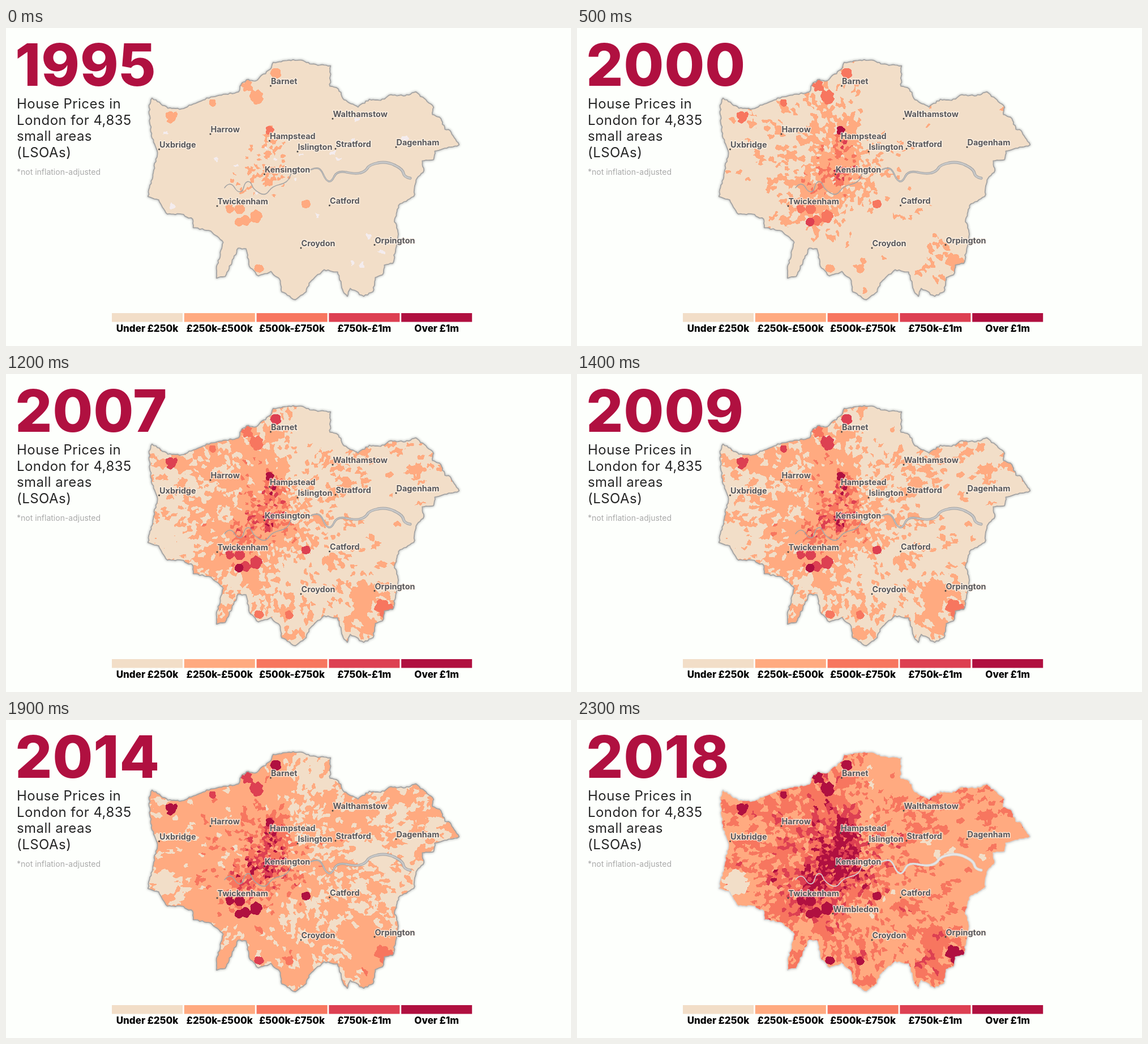
Recreate the animation shown at these times as an HTML page with a canvas. Size 998 by 561 pixels, loop 5.3 s.

```html
<!DOCTYPE html>
<html lang="en">
<head>
<meta charset="utf-8">
<title>House prices in London</title>
<style>
html, body { margin: 0; width: 100%; height: 100%; overflow: hidden; background: #fdfffc; }
canvas, svg { position: absolute; left: 0; top: 0; }
text { font-family: Inter, "Open Sans", sans-serif; }
.year { font-size: 103px; font-weight: 800; letter-spacing: .6px; fill: #b01040; }
.title { font-size: 24px; letter-spacing: .45px; fill: #262626; }
.note { font-size: 14px; fill: #aaa; }
.key { font-size: 17px; font-weight: 800; text-anchor: middle; }
.place { font-size: 14.4px; font-weight: 700; fill: #58585c; stroke: #fff4ea; stroke-opacity: .75;
  stroke-width: 3px; stroke-linejoin: round; paint-order: stroke; }
</style>
</head>
<body>
<canvas width="998" height="561"></canvas>
<svg width="998" height="561"></svg>
<script>
const ctx = document.querySelector('canvas').getContext('2d');
const svg = document.querySelector('svg');
const COLORS = ['#f2dec8', '#ffaa80', '#f7765f', '#dd4052', '#b01040'];
const NO_DATA = '#f4ecee';
const LEGEND = ['Under £250k', '£250k-£500k', '£500k-£750k', '£750k-£1m', 'Over £1m'];
const PLACES = {
  Barnet: [467.5, 102], Walthamstow: [577, 160], Harrow: [361, 187], Hampstead: [465.5, 199],
  Islington: [515, 218], Stratford: [582, 213], Dagenham: [689, 210], Uxbridge: [270.5, 214],
  Kensington: [456.5, 258], Twickenham: [373, 314], Catford: [571.5, 313], Croydon: [521, 388],
  Orpington: [651, 382.5], Wimbledon: [452, 341.5]
};

const OUTLINE = `258,124 286,142 310,143 362,122 411,113 417,97 428,91 440,94 467,73 472,61 500,57 525,58
  540,64 573,67 572,103 587,108 597,127 622,140 642,126 662,128 680,118 705,120 724,113 755,140 753,153
  768,160 775,179 784,181 800,206 757,217 755,232 735,234 738,251 724,268 720,297 693,313 686,338 692,360
  688,390 683,415 668,418 665,435 652,440 648,465 632,473 608,459 603,473 596,465 586,430 562,426 535,450
  530,465 511,479 487,465 485,446 468,429 446,437 430,420 424,389 410,388 387,438 372,441 372,425 384,378
  362,358 331,352 330,337 310,328 285,328 270,303 251,297 268,220 257,190 253,140`;
const RIVER = `382,288 390,276 400,275 408,289 418,289 422,272 432,270 437,285 458,297 470,279 498,273
  505,251 520,248 537,251 545,247 556,248 565,269 575,272 585,251 618,258 635,253 642,241 672,235
  701,249 703,263 725,267`;

// Prices are logarithms relative to £250k. Hills fade out, districts have edges: x, y, radius, height.
const HILLS = [
  [420,230,110,.2], [470,255,24,.75], [468,200,24,.65], [430,290,38,.55], [440,115,55,.22],
  [330,140,45,.15], [365,325,40,.25], [500,430,40,.27], [630,410,50,.35], [605,165,25,.25],
  [745,190,36,.22], [680,230,55,-.25], [505,380,30,-.2], [553,110,28,-.3]];
const DISTRICTS = [
  [465,180,8,2], [292,156,11,1.37], [425,102,10,1.25], [441,121,12,1.3], [476,78,10,1.37],
  [413,318,10,1.5], [395,317,8,1.37], [411,342,7,1.65], [424,339,9,1.45], [441,332,11,1.45],
  [529,310,8,1.37], [447,424,8,1.15], [500,425,8,1], [667,412,15,1], [365,131,7,1.3], [280,288,22,-.6]];
const BAND_LIMITS = [1, 2, 3, 4].map(Math.log);

// Steep rise, a plateau around 2007, then a second rise.
function growth(year) {
  const s = (year - 2007) / 12;
  return -.22 + .17 * s + .75 * s ** 3;
}

const rand = (a, b = 0, c = 0) => {
  const s = Math.sin(a * 127.1 + b * 311.7 + c * 74.7) * 43758.5453;
  return s - Math.floor(s);
};
const mix = (a, b, t) => a + (b - a) * t;
function smoothNoise(x, y, seed) {
  const i = Math.floor(x), j = Math.floor(y), u = x - i, v = y - j;
  return mix(mix(rand(i, j, seed), rand(i + 1, j, seed), u),
    mix(rand(i, j + 1, seed), rand(i + 1, j + 1, seed), u), v);
}
const points = text => text.trim().split(/\s+/).map(pair => pair.split(',').map(Number));

function ragged(corners) {
  const path = new Path2D();
  corners.forEach(([x, y], k) => {
    const [nx, ny] = corners[(k + 1) % corners.length];
    const length = Math.hypot(nx - x, ny - y), steps = Math.ceil(length / 4);
    for (let s = 0; s < steps; s++) {
      const t = s / steps, d = s ? (rand(k, s) - .5) * 2.6 / length : 0;
      path.lineTo(mix(x, nx, t) - (ny - y) * d, mix(y, ny, t) + (nx - x) * d);
    }
  });
  path.closePath();
  return path;
}
const border = ragged(points(OUTLINE));

// Small areas: a jittered grid around the centre whose cells grow outwards.
const LEFT = 246, TOP = 52, W = 558, H = 432, GRID = 100, HALF = 50;
const CX = 480, CY = 245, SPREAD = 150, DENSITY = 36;
const seeds = [], prices = [];
for (let id = 0; id < GRID * GRID; id++) {
  const i = id % GRID - HALF, j = Math.floor(id / GRID) - HALF;
  const u = i + rand(i, j, 1), v = j + rand(i, j, 2), R = Math.hypot(u, v);
  const stretch = SPREAD * (Math.exp(R / DENSITY) - 1) / R;
  const x = CX + u * stretch, y = CY + v * stretch;
  const hills = HILLS.reduce((sum, [hx, hy, r, height]) =>
    sum + height * Math.exp(-((x - hx) ** 2 + (y - hy) ** 2) / (2 * r * r)), 0);
  const variety = .32 + .45 * Math.exp(-((R / 18) ** 2));
  seeds.push([u, v]);
  prices.push(hills + (rand(id, 3) + rand(id, 4) - 1) * variety + (smoothNoise(x / 14, y / 14, 5) - .5) * .7);
}
const districtIds = GRID * GRID;
prices.push(...DISTRICTS.map(d => d[3]));

const areaOf = new Uint16Array(W * H);
for (let p = 0; p < W * H; p++) {
  const x = LEFT + p % W, y = TOP + Math.floor(p / W);
  const dx = x - CX + .01, dy = y - CY, r = Math.hypot(dx, dy);
  const scale = DENSITY * Math.log(1 + r / SPREAD) / r;
  const u = dx * scale + (smoothNoise(x / 4, y / 4, 6) - .5) * .8;
  const v = dy * scale + (smoothNoise(x / 4, y / 4, 7) - .5) * .8;
  const i = Math.floor(u) + HALF, j = Math.floor(v) + HALF;
  let nearest = Infinity;
  for (let b = j - 1; b <= j + 1; b++) for (let a = i - 1; a <= i + 1; a++) {
    const id = b * GRID + a, d = (seeds[id][0] - u) ** 2 + (seeds[id][1] - v) ** 2;
    if (d < nearest) { nearest = d; areaOf[p] = id; }
  }
  const reach = .4 + 1.1 * smoothNoise(x / 5, y / 5, 8);
  const district = DISTRICTS.findIndex(([px, py, radius]) =>
    (x - px) ** 2 + (y - py) ** 2 < radius * radius * reach);
  if (district >= 0) areaOf[p] = districtIds + district;
}

const layer = new OffscreenCanvas(W, H), layerCtx = layer.getContext('2d');
const image = layerCtx.createImageData(W, H), pixels = new Uint32Array(image.data.buffer);
const packed = [...COLORS, NO_DATA].map(color => {
  const n = parseInt(color.slice(1), 16);
  return (0xff000000 | (n & 255) << 16 | n & 0xff00 | n >> 16) >>> 0;
});

function paintAreas(year) {
  const colorOf = prices.map((price, id) => {
    const isDistrict = id >= districtIds;
    if (!isDistrict && year < 2000 && rand(id, 10) < .006) return packed[5];
    const wobble = isDistrict ? 0 : (rand(id, year, 9) - .5) * .14;
    const value = price + growth(year) + wobble;
    return packed[BAND_LIMITS.filter(limit => value >= limit).length];
  });
  for (let p = 0; p < W * H; p++) pixels[p] = colorOf[areaOf[p]];
  layerCtx.putImageData(image, 0, 0);
}

// The river widens towards the east.
function drawRiver(color, inset) {
  const course = points(RIVER);
  ctx.strokeStyle = color;
  for (let i = 1; i < course.length - 1; i++) {
    const [a, b, c] = course.slice(i - 1, i + 2);
    const width = 1.5 + 3.5 * Math.max(0, Math.min(1, (b[0] - 500) / 150)) - inset;
    if (width <= 0) continue;
    ctx.lineWidth = width;
    ctx.beginPath();
    ctx.moveTo((a[0] + b[0]) / 2, (a[1] + b[1]) / 2);
    ctx.quadraticCurveTo(b[0], b[1], (b[0] + c[0]) / 2, (b[1] + c[1]) / 2);
    ctx.stroke();
  }
}

function drawMap(year) {
  const pale = year == 2018;
  const line = pale ? '#d6d6d6' : '#a4a4a4';
  paintAreas(year);
  ctx.clearRect(0, 0, 998, 561);
  ctx.lineJoin = ctx.lineCap = 'round';
  ctx.strokeStyle = line;
  ctx.save();
  ctx.shadowColor = pale ? '#ccc' : '#999';
  ctx.shadowBlur = 4;
  ctx.lineWidth = 2.4;
  ctx.stroke(border);
  ctx.restore();
  ctx.save();
  ctx.clip(border);
  ctx.drawImage(layer, LEFT, TOP);
  ctx.restore();
  ctx.lineWidth = 1.2;
  ctx.stroke(border);
  drawRiver(line, 0);
  drawRiver(pale ? '#e6e6e6' : '#c8c8c8', 2);
}

function add(tag, attributes, text = '') {
  const node = document.createElementNS(svg.namespaceURI, tag);
  for (const name in attributes) node.setAttribute(name, attributes[name]);
  node.textContent = text;
  return svg.appendChild(node);
}
const write = (kind, x, y, text) => add('text', { class: kind, x, y }, text);

const yearText = write('year', 16, 102, '');
['House Prices in', 'London for 4,835', 'small areas', '(LSOAs)']
  .forEach((line, i) => write('title', 19, 142 + i * 28.7, line));
write('note', 19, 259, '*not inflation-adjusted');
LEGEND.forEach((label, i) => {
  const x = 187 + i * 127.8;
  add('rect', { x, y: 503, width: 125, height: 15.5, fill: COLORS[i] });
  write('key', x + 62.5, 535.5, label);
});
let lastPlace;
for (const [name, [x, y]] of Object.entries(PLACES)) {
  lastPlace = [add('circle', { cx: x, cy: y, r: 1.5, fill: '#444' }), write('place', x + .5, y - 3, name)];
}

let shown;
function frame() {
  const year = 1995 + Math.min(23, Math.floor(performance.now() % 5300 / 100));
  if (year != shown) {
    shown = year;
    yearText.textContent = year;
    for (const node of lastPlace) node.style.display = year == 2018 ? '' : 'none';
    drawMap(year);
  }
  requestAnimationFrame(frame);
}
frame();
</script>
</body>
</html>
```
